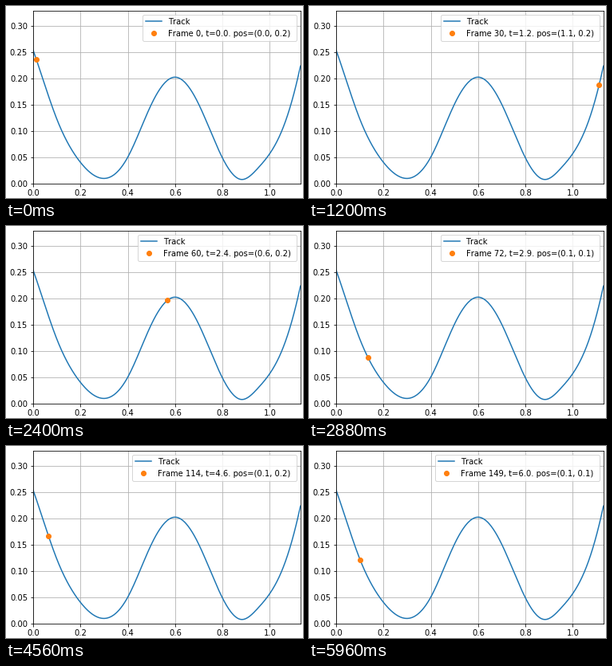
Animation, 372 px wide and 241 px high, one loop 6000 ms. Source, as a matplotlib script:

```python
import numpy as np
import matplotlib.pyplot as plt
from matplotlib.animation import FuncAnimation

W, H, DPI = 372, 241, 72
FRAMES, STEP = 150, 40
X_END, Y_END = 1.1297, .3297
ROLL = 10 / 7 * 9.81  # v^2 = ROLL * (energy height - y) for a rolling ball

# Key points of the track
KNOT_X = np.array([0, .1, .2, .31, .4, .5, .6, .7, .8, .88, .95, 1.05, X_END])
KNOT_Y = np.array([.254, .123, .0405, .0104, .0505, .1513, .2027, .151,
                   .049, .008, .0295, .0995, .224])

# Start, turning points and hill crossing: time in steps, x, spare height
KEYS = [
    (0, .0135, .0035), (32.4, 1.126, 0), (54.8, .6, .0008), (77.4, .0475, 0),
    (94.9, .539, 0), (113, .0615, 0), (129.3, .511, 0), (146.06, .0775, 0),
    (162.3, .493, 0),
]


def spline(kx, ky, start, end):
    """Cubic spline with given end slopes."""
    h = np.diff(kx)
    d = np.diff(ky) / h
    a = np.eye(len(kx))
    rhs = np.zeros(len(kx))
    rhs[0], rhs[-1] = start, end
    for i in range(1, len(kx) - 1):
        a[i, i - 1:i + 2] = h[i], 2 * (h[i - 1] + h[i]), h[i - 1]
        rhs[i] = 3 * (h[i] * d[i - 1] + h[i - 1] * d[i])
    m = np.linalg.solve(a, rhs)

    def f(x):
        i = np.clip(np.searchsorted(kx, x) - 1, 0, len(h) - 1)
        u = (x - kx[i]) / h[i]
        v = 1 - u
        return (ky[i] * v**2 * (1 + 2 * u) + ky[i + 1] * u**2 * (1 + 2 * v)
                + h[i] * u * v * (m[i] * v - m[i + 1] * u))
    return f


track = spline(KNOT_X, KNOT_Y, -1.27, 2.1)


def roll(p, q, n=400):
    """Times and positions between two keys, losing energy evenly with x."""
    (t0, x0, up0), (t1, x1, up1) = p, q
    x = x0 + (x1 - x0) * (1 - np.cos(np.linspace(0, np.pi, n))) / 2
    mid = (x[1:] + x[:-1]) / 2
    e0, e1 = track(x0) + up0, track(x1) + up1
    energy = e0 + (e1 - e0) * (mid - x0) / (x1 - x0)
    speed = np.sqrt(ROLL * np.maximum(energy - track(mid), 1e-5))
    t = np.append(0, np.cumsum(np.hypot(np.diff(x), np.diff(track(x))) / speed))
    return t0 + (t1 - t0) * t / t[-1], x


path_t, path_x = np.hstack([roll(p, q) for p, q in zip(KEYS, KEYS[1:])])
ball_x = np.interp(np.arange(FRAMES), path_t, path_x)
ball_y = track(ball_x)


def label(k):
    return (f"Frame {k}, t={k * STEP / 1000:.1f}. "
            f"pos=({ball_x[k]:.1f}, {ball_y[k]:.1f}) ")


plt.rcParams["text.kerning_factor"] = 6
fig = plt.figure(figsize=(W / DPI, H / DPI), dpi=DPI, facecolor="white")
ax = fig.add_axes([34 / W, 18 / H, 334.8 / W, 217.44 / H])
xs = np.linspace(0, X_END, 500)
ax.plot(xs, track(xs), label="Track")
ball, = ax.plot(ball_x[:1], ball_y[:1], "o", label=label(0))
ax.set_xlim(0, X_END)
ax.set_ylim(0, Y_END)
ax.grid()
caption = ax.legend(loc="upper right").get_texts()[1]


def draw(k):
    ball.set_data([ball_x[k]], [ball_y[k]])
    caption.set_text(label(k))
    return ball, caption


anim = FuncAnimation(fig, draw, frames=FRAMES, interval=STEP, repeat=True)
plt.show()
```
